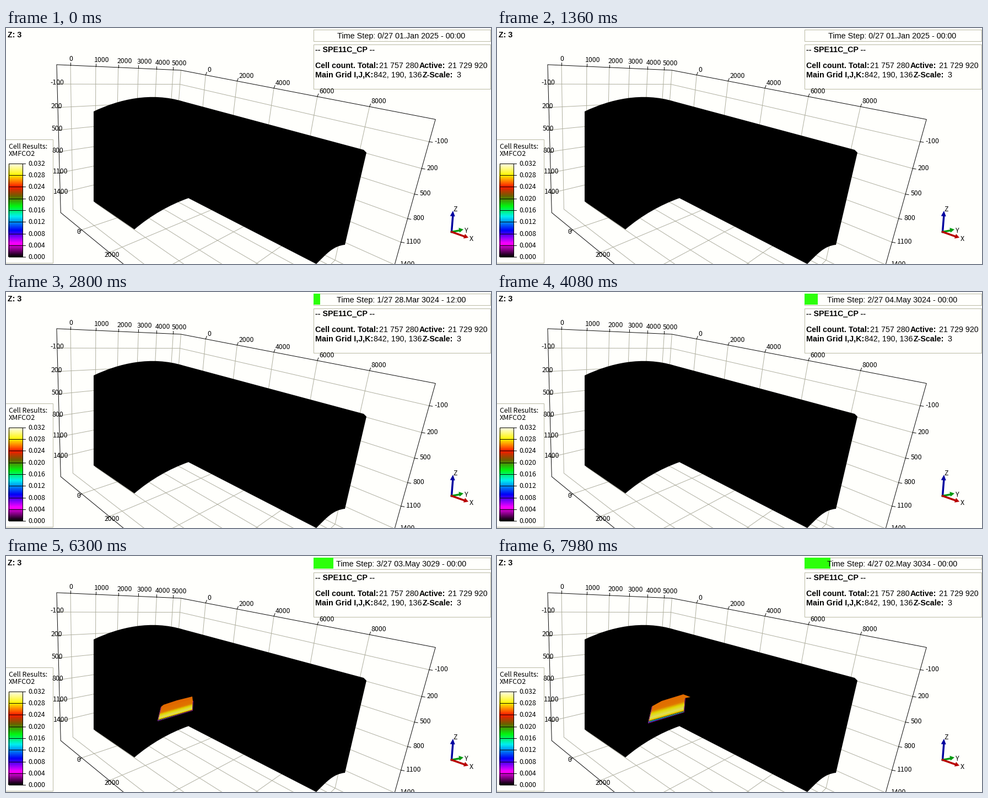
Animation, 880 px wide and 430 px high, one loop 8 s. Source, as a matplotlib script:

```python
import numpy as np
import matplotlib.pyplot as plt
from matplotlib.animation import FuncAnimation
from matplotlib.colors import LinearSegmentedColormap
from matplotlib.patches import PathPatch, Polygon, Rectangle
from matplotlib.path import Path

W, H, DPI = 880, 430, 100
INTERVAL, FRAMES = 80, 100
FIRST_STEP, STEP_TIME = 1680, 1600  # ms
DATES = ["01.Jan 2025 - 00:00", "28.Mar 3024 - 12:00", "04.May 3024 - 00:00",
         "03.May 3029 - 00:00", "02.May 3034 - 00:00"]
PAPER, GRID, BORDER = "#fffffc", "#acac9c", "#b9b9a4"
AXIS_FONT, INFO_FONT = "Noto Sans CJK JP", "Liberation Sans"

# grid box in thousands of metres
X0, X1, Y0, Y1, Z0, Z1 = -1.8, 10.06, -0.5, 5.5, -0.34, 1.7
X_TICKS, Y_TICKS = np.arange(0, 10, 2), np.arange(6)
Z_TICKS = np.arange(-0.1, 1.5, 0.3)
ANCHORS = [((X0, Y0, Z0), (92, 66)), ((X0, Y1, Z0), (316, 76)),
           ((X1, Y1, Z0), (779, 168)), ((X0, Y0, Z1), (99, 337)),
           ((X1, Y1, 1.4), (705, 430)), ((0, Y0, Z1), (137, 367)),
           ((2, Y0, Z1), (186, 408)), ((4, Y1, Z0), (485, 108)),
           ((X0, 2, Z0), (203, 71)), ((X0, Y1, -0.1), (316, 103))]

SCALE = LinearSegmentedColormap.from_list("scale", [
    (0, "#fffff0"), (0.125, "#fff600"), (0.25, "#ff1800"), (0.35, "#6a6000"),
    (0.46, "#00f810"), (0.57, "#00f0f0"), (0.72, "#0000f8"), (0.86, "#ff00ff"),
    (1, "black")])

fig = plt.figure(figsize=(W / DPI, H / DPI), dpi=DPI, facecolor=PAPER)
ax = fig.add_axes([0, 0, 1, 1])
ax.set_xlim(0, W)
ax.set_ylim(H, 0)
ax.set_autoscale_on(False)
ax.axis("off")


def fit_camera():
    """Least-squares projection matrix through the anchor points."""
    rows, values = [], []
    for point, screen in ANCHORS:
        for k, s in enumerate(screen):
            row = np.zeros(11)
            row[4 * k:4 * k + 4] = *point, 1
            row[8:] = -s / 100 * np.array(point)
            rows.append(row)
            values.append(s / 100)
    fit = np.linalg.lstsq(np.array(rows), np.array(values), rcond=None)[0]
    return np.append(fit, 1).reshape(3, 4)


CAMERA = fit_camera()


def project(x, y, z):
    u, v, w = CAMERA @ (x, y, z, 1)
    return 100 * u / w, 100 * v / w


def line(points, color=GRID, width=0.95, z=1):
    x, y = np.transpose(points) + 0.5
    return ax.plot(x, y, color=color, lw=width * 72 / DPI, zorder=z)[0]


def edge(*points, color=GRID):
    line([project(*p) for p in points], color)


def label(x, y, text, px=12.3, font=AXIS_FONT, ha="left", **kw):
    return ax.text(x, y, text, fontsize=px * 72 / DPI, family=font, ha=ha,
                   va="baseline", color="black", zorder=6, **kw)


def tick_label(point, value, tick, offset):
    x, y = project(*point)
    line([(x, y), (x + tick[0], y + tick[1])], "black")
    label(x + offset[0], y + offset[1], f"{1000 * value:.0f}")


def box(x0, y0, x1, y1, face=PAPER, rim=BORDER, z=4):
    ax.add_patch(Rectangle((x0 + 0.5, y0 + 0.5), x1 - x0, y1 - y0, fc=face,
                           ec=rim, lw=0.72, zorder=z))


def draw_grid():
    for x in X_TICKS:
        edge((x, Y1, Z0), (x, Y1, Z1), (x, Y0, Z1))
        tick_label((x, Y1, Z0), x, (2, -5), (3.5, -5.5))
    for y in Y_TICKS:
        edge((X0, y, Z0), (X0, y, Z1), (X1, y, Z1))
        tick_label((X0, y, Z0), y, (0, -5), (-2, -7.5))
    for z in Z_TICKS:
        edge((X0, Y0, z), (X0, Y1, z), (X1, Y1, z))
        tick_label((X0, Y0, z), z, (5, 0), (-12, 1.5))
        tick_label((X1, Y1, z), z, (6, 1), (10, 3))
    for x in X_TICKS[:2]:
        tick_label((x, Y0, Z1), x, (-5, 3), (-8, 8))
    edge((X0, Y1, Z0), (X0, Y1, Z1), (X1, Y1, Z1))
    edge((X1, Y1, Z1), (X1, Y1, Z0), (X0, Y1, Z0), (X0, Y0, Z0), (X0, Y0, Z1),
         (X1, Y0, Z1), color="black")


def draw_body():
    m, l, c = Path.MOVETO, Path.LINETO, Path.CURVE4
    steps = [(m, (159, 152)), (c, (205, 130)), (c, (263, 116)), (c, (322, 134)),
             (l, (649, 222)), (l, (654, 227)), (l, (615, 395)),
             (c, (594, 397)), (c, (582, 411)), (c, (563, 430)),
             (l, (331, 310)), (c, (297, 322)), (c, (262, 342)), (c, (233, 367)),
             (l, (159, 316)), (l, (159, 152))]
    codes, points = zip(*steps)
    ax.add_patch(PathPatch(Path(points, codes), fc="black", ec="none", zorder=2))


def draw_legend():
    box(-2, 202, 84, 427)
    label(5, 220, "Cell Results:", 12.4)
    label(5, 233, "XMFCO2", 12.4)
    ax.imshow(np.linspace(0, 1, 171)[:, None], cmap=SCALE, extent=(4, 30, 417, 246),
              aspect="auto", zorder=5)
    box(4, 246, 29, 416, "none", "black", 5)
    for i in range(9):
        y = round(246 + 21.25 * i)
        line([(4, y), (34, y)], "black", z=6)
        label(40, y + 5, f"{0.032 - 0.004 * i:.3f}")


def draw_info():
    box(557, 2, 878, 23)
    box(557, 29, 878, 110)
    bold = [(3, 17, "Z: 3"), (561, 44, "-- SPE11C_CP --"),
            (561, 73, "Cell count. Total:"), (750, 73, "Active:"),
            (561, 90, "Main Grid I,J,K:"), (756, 90, "Z-Scale:")]
    plain = [(677, 73, "21 757 280"), (802, 73, "21 729 920"),
             (667, 90, "842, 190, 136"), (817, 90, "3")]
    for rows, weight in ((bold, "bold"), (plain, "normal")):
        for x, y, text in rows:
            label(x, y, text, 14.2, INFO_FONT, weight=weight)


def draw_triad():
    origin = np.array([808, 371])
    for name, color, tip, size in [("Z", "#0000a0", (811, 333), 10),
                                   ("Y", "#009a10", (830, 367), 8),
                                   ("X", "#b80000", (839, 382), 8)]:
        tip = np.array(tip)
        along = (tip - origin) / np.linalg.norm(tip - origin)
        side = along[::-1] * (-1, 1) * 4.5
        base = tip - along * size
        line([origin, base], color, 3.5, 3)
        ax.add_patch(Polygon([base + side, tip, base - side], fc=color, zorder=3))
        dx, dy = (4, 1) if name == "Z" else (5, 6)
        label(tip[0] + dx, tip[1] + dy, name, 12.4, ha="center")


def make_plume(outline, bottom, band):
    """Concentration by height above a sloping floor, in the legend's colours."""
    x, y = np.meshgrid(np.arange(268, 356) + 0.5, np.arange(246, 310) + 0.5)
    height = (bottom - 0.29 * (x - 275) - y) / band
    level = np.interp(height, [0, 0.25, 0.5, 0.9, 1.3, 2.5],
                      [0.9, 0.14, 0.07, 0.12, 0.19, 0.2])
    image = ax.imshow(0.88 * SCALE(level)[..., :3], extent=(268, 356, 310, 246),
                      aspect="auto", zorder=3)
    shape = Polygon(outline, fc="none", ec="none")
    ax.add_patch(shape)
    image.set_clip_path(shape)
    rim = line(outline[:4], "#8a1890", z=3)
    return [image, rim]


draw_grid()
draw_body()
draw_legend()
draw_info()
draw_triad()
plumes = {
    3: make_plume([(281, 275), (275, 300), (338, 281), (339, 264), (338, 256),
                   (310, 263), (286, 271)], 301, 11),
    4: make_plume([(281, 274), (274, 304), (339, 284), (341, 259), (351, 257),
                   (338, 252), (299, 264)], 304, 16),
}
bar = Rectangle((558, 3), 0, 20, fc="#2cff0a", ec="none", zorder=5)
ax.add_patch(bar)
caption = label(717.5, 19, "", 14.4, INFO_FONT, "center")


def update(frame):
    step = max(0, (frame * INTERVAL - FIRST_STEP) // STEP_TIME + 1)
    bar.set_width(320 * step / 27)
    caption.set_text(f"Time Step: {step}/27 {DATES[step]}")
    for number, parts in plumes.items():
        for part in parts:
            part.set_visible(number == step)
    return [bar, caption]


anim = FuncAnimation(fig, update, frames=FRAMES, interval=INTERVAL, repeat=True,
                     repeat_delay=0)
plt.show()
```
